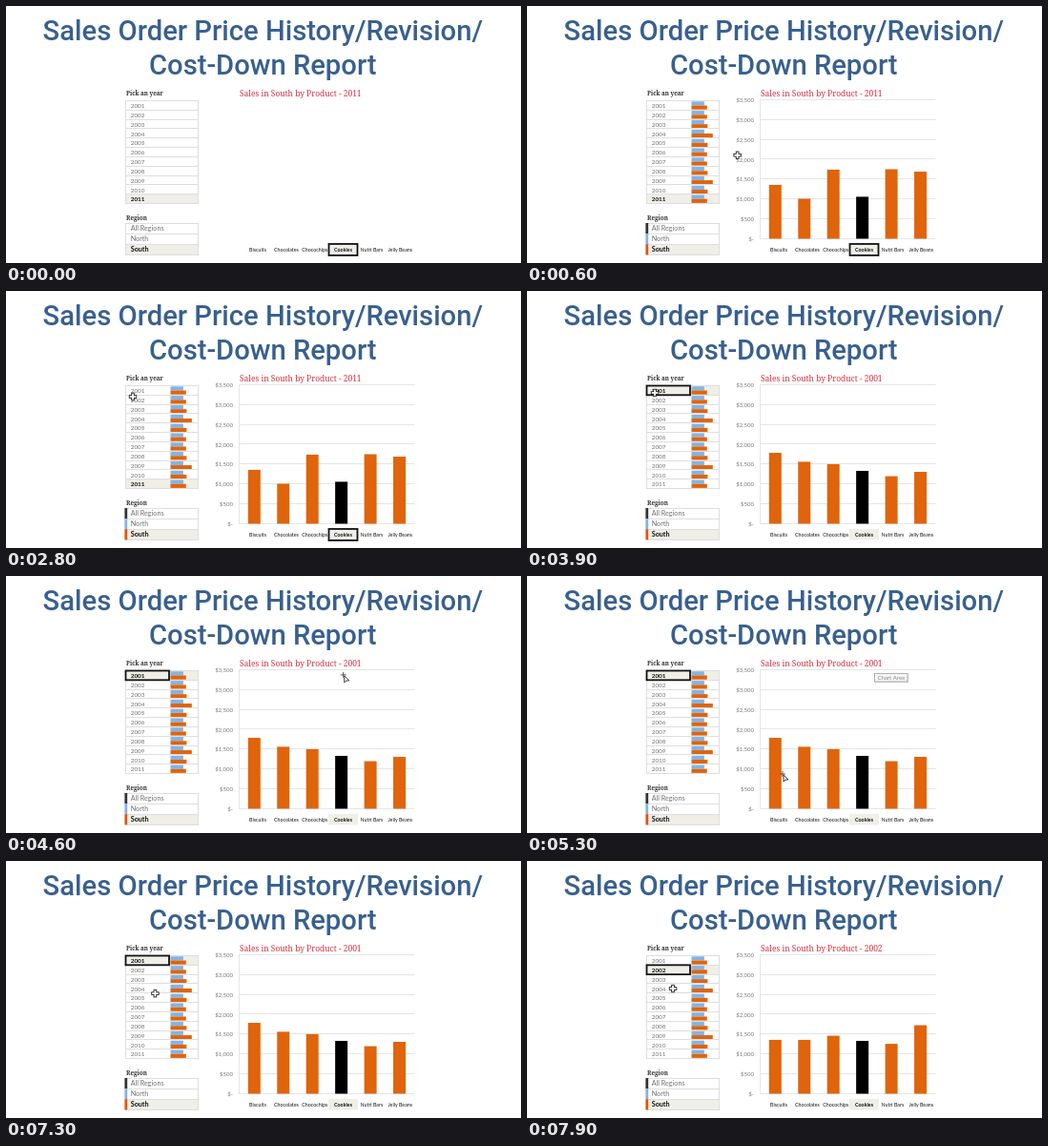
An HTML page with a canvas that plays this animation: 540 by 270 pixels, repeating every 8000 ms.

```html
<!DOCTYPE html>
<html lang="en">
<head>
<meta charset="utf-8">
<title>Sales report</title>
<style>
html, body { margin: 0; width: 100%; height: 100%; overflow: hidden; background: #fff; }
canvas { display: block; }
</style>
</head>
<body>
<canvas id="stage" width="540" height="270"></canvas>
<script>
const ctx = document.getElementById('stage').getContext('2d');
const LOOP = 8000, STEP = 100;
const SANS = 'Lato, Carlito, sans-serif', SERIF = '"Noto Serif", serif';
const ORANGE = '#df640c', BLUE = '#82b4e6', SHADE = '#efeee7', RULE = '#dedede';
const ROW = 9.82, LIST_TOP = 99.5, BASE = 244.5, GRID = 20.8;

const products = ['Biscuits', 'Chocolates', 'Chocochips', 'Cookies', 'Nutri Bars', 'Jelly Beans'];
const sales = {
  2011: [1360, 1010, 1745, 1060, 1755, 1695],
  2001: [1790, 1565, 1505, 1335, 1200, 1310],
  2002: [1360, 1360, 1465, 1335, 1260, 1730]
};

// Pointer stops: time, x, y
const stops = [
  [100, 330, 238], [900, 155, 108], [1500, 258, 100], [1900, 410, 160],
  [2800, 133, 111], [3900, 134, 107], [4500, 368, 92], [5300, 270, 211],
  [6500, 414, 234], [7200, 157, 140], [7900, 153, 134]
];

function rect(x, y, w, h, color) {
  ctx.fillStyle = color;
  ctx.fillRect(x, y, w, h);
}

function frame(x, y, w, h, color, width = 1) {
  ctx.strokeStyle = color;
  ctx.lineWidth = width;
  ctx.strokeRect(x, y, w, h);
}

function text(str, x, y, font, color, align = 'left') {
  ctx.font = font;
  ctx.fillStyle = color;
  ctx.textAlign = align;
  ctx.fillText(str, x, y);
}

function drawHeading() {
  const font = '500 29.2px Roboto, sans-serif';
  text('Sales Order Price History/Revision/', 269.3, 35.5, font, '#38608f', 'center');
  text('Cost-Down Report', 269.3, 71.5, font, '#38608f', 'center');
}

function drawYears(year, loaded) {
  text('Pick an year', 126, 94.4, `bold 6.25px ${SERIF}`, '#333');
  for (let i = 0; i < 11; i++) {
    const y = LIST_TOP + i * ROW, on = 2001 + i === year;
    if (on) rect(125, y, 77, ROW, SHADE);
    rect(125, Math.floor(y), 77, 1, RULE);
    text(2001 + i, 130.7, y + 7.7, `${on ? 'bold ' : ''}6.4px ${SANS}`, on ? '#111' : '#707070');
    if (loaded) {
      // Orange lengths peak every fifth year
      const peak = Math.max(0, Math.cos((i - 3) * Math.PI * 0.4)) ** 2;
      rect(172.5, y + 0.8, 13.4, 4.2, BLUE);
      rect(172.5, y + 5, 16.3 + 6 * peak, 4.2, ORANGE);
    }
  }
  frame(125.5, 99.5, 76, 108, RULE);
  if (year !== 2011) frame(125.5, LIST_TOP + (year - 2001) * ROW, 45.5, ROW, '#111', 1.8);
}

function drawRegions(loaded) {
  text('Region', 126, 225.2, `bold 6.3px ${SERIF}`, '#333');
  rect(125, 250, 77, 11.5, SHADE);
  frame(125.5, 228.5, 76, 33, RULE);
  ['All Regions', 'North', 'South'].forEach((name, i) => {
    const y = 228 + i * 11.1, on = i === 2;
    rect(125, Math.round(y), 77, 1, RULE);
    if (loaded) rect(124.4, y, 2.8, 11.2, ['#333', BLUE, '#e0560c'][i]);
    text(name, 130.7, y + 7.8, `${on ? 'bold ' : ''}7.2px ${SANS}`, on ? '#111' : '#707070');
  });
}

function drawChart(year, loaded) {
  text(`Sales in South by Product - ${year}`, 245, 94.7, `500 8.45px ${SERIF}`, '#d62f3f');
  if (loaded) {
    for (let i = 0; i <= 7; i++) {
      const y = BASE - i * GRID;
      rect(244, Math.round(y) - 1, 184.5, 1, '#e3e6ea');
      const label = i ? '$' + (i * 500).toLocaleString('en-US') : '$-';
      text(label, 238, y + 2.2, `6px ${SANS}`, '#777', 'right');
    }
    rect(244, 99, 1, 146, '#e3e6ea');
    sales[year].forEach((value, i) => {
      const h = value / 500 * GRID;
      rect(253.8 + i * 30.45, BASE - h, 13, h, i === 3 ? '#000' : ORANGE);
    });
  }
  rect(338, 250, 31, 11.5, SHADE);
  if (year === 2011) frame(338.5, 250, 30, 12, '#111', 1.8);
  products.forEach((name, i) =>
    text(name, 264 + i * 29.85, 258, `${i === 3 ? 'bold ' : ''}5.3px ${SANS}`, '#111', 'center'));
}

function drawTooltip() {
  rect(365, 103, 35, 9, '#d4d4d4');
  rect(364.5, 102.5, 34.5, 8.5, '#f5f5f5');
  frame(364.5, 102.5, 34.5, 8.5, '#b0b0b0');
  text('Chart Area', 381.8, 108.9, `6px ${SANS}`, '#888', 'center');
}

function plus(x, y, reach, width, color) {
  rect(x - reach, y - width / 2, reach * 2, width, color);
  rect(x - width / 2, y - reach, width, reach * 2, color);
}

function arrow(x, y) {
  ctx.beginPath();
  ctx.moveTo(x, y);
  ctx.lineTo(x, y + 7);
  ctx.lineTo(x + 2, y + 5.2);
  ctx.lineTo(x + 5, y + 5);
  ctx.closePath();
  ctx.fillStyle = '#fff';
  ctx.fill();
  ctx.strokeStyle = '#222';
  ctx.lineWidth = 0.9;
  ctx.stroke();
}

function pointerAt(t) {
  const i = Math.max(1, stops.findIndex(stop => stop[0] >= t));
  const [t0, x0, y0] = stops[i - 1], [t1, x1, y1] = stops[i];
  const k = (t - t0) / (t1 - t0);
  return [x0 + (x1 - x0) * k, y0 + (y1 - y0) * k];
}

function drawPointer(t) {
  const [x, y] = pointerAt(t);
  if (x < 240) {
    plus(x, y, 4.2, 3.6, '#222');
    plus(x, y, 3.3, 1.8, '#fff');
  } else if (y > 225) {
    arrow(x - 1, y - 4);
  } else {
    plus(x - 2, y - 3, 3, 0.9, '#444');
    arrow(x - 1, y - 2);
  }
}

function render(now) {
  const t = Math.floor(now % LOOP / STEP) * STEP;
  const loaded = t >= 100;
  const year = t < 3100 ? 2011 : t < 7500 ? 2001 : 2002;
  rect(0, 0, 540, 270, '#fff');
  drawHeading();
  drawYears(year, loaded);
  drawRegions(loaded);
  drawChart(year, loaded);
  if (t >= 5000 && t < 5600) drawTooltip();
  if (loaded) drawPointer(t);
}

let start;
function tick(now) {
  start ??= now;
  render(now - start);
  requestAnimationFrame(tick);
}
requestAnimationFrame(tick);
</script>
</body>
</html>
```
